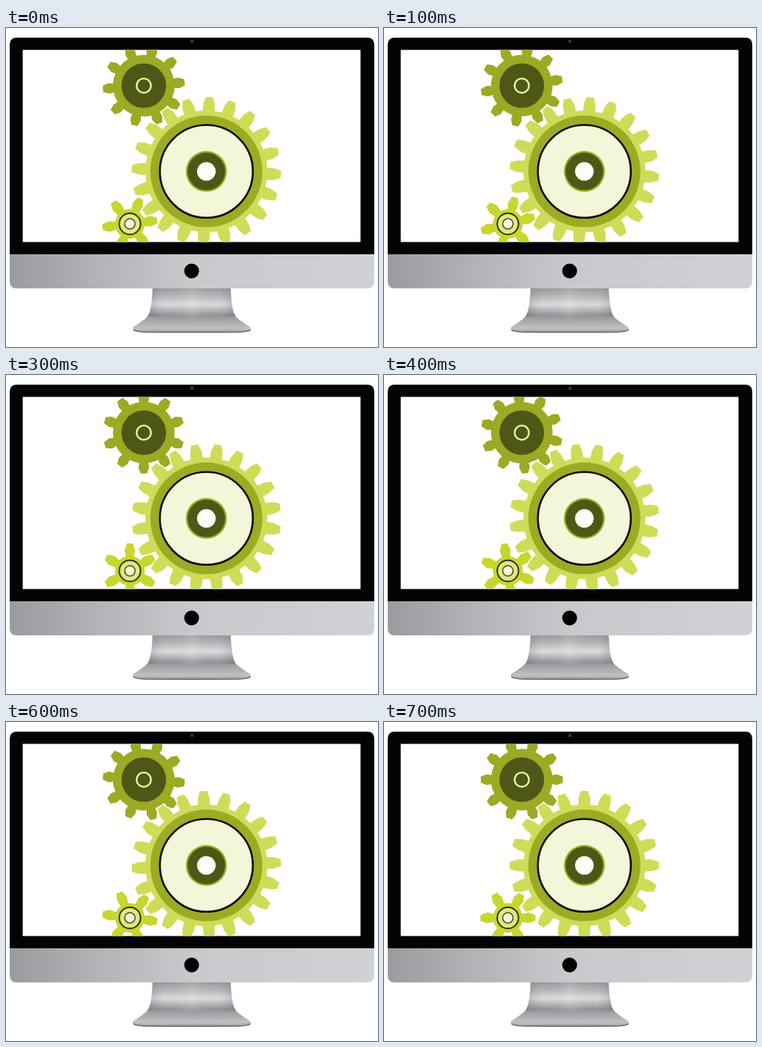
Animation of 500 by 430 pixels, one loop 800 ms. Source, as an HTML page:

```html
<!DOCTYPE html>
<html lang="en">
<head>
<meta charset="utf-8">
<title>Gears on a desktop screen</title>
<style>
  html, body { margin: 0; width: 100%; height: 100%; overflow: hidden; background: #fff; }
  svg { display: block; width: 500px; height: 430px; }
</style>
</head>
<body>
<svg viewBox="0 0 500 430" width="500" height="430">
  <defs>
    <clipPath id="screen"><rect x="22.5" y="29.5" width="454" height="259"/></clipPath>
    <linearGradient id="chin" x1="0" y1="0" x2="1" y2="0">
      <stop offset="0" stop-color="#9b9b9f"/>
      <stop offset=".25" stop-color="#b4b4b8"/>
      <stop offset=".5" stop-color="#c9c9cd"/>
      <stop offset="1" stop-color="#d1d1d5"/>
    </linearGradient>
    <linearGradient id="metal" x1="0" y1="351" x2="0" y2="411" gradientUnits="userSpaceOnUse">
      <stop offset="0" stop-color="#9a9a9f"/>
      <stop offset=".15" stop-color="#b2b2b6"/>
      <stop offset=".36" stop-color="#dcdce0"/>
      <stop offset=".44" stop-color="#c4c4c8"/>
      <stop offset=".6" stop-color="#929297"/>
      <stop offset=".75" stop-color="#a9a9ae"/>
      <stop offset=".9" stop-color="#c2c2c6"/>
      <stop offset="1" stop-color="#949498"/>
    </linearGradient>
    <linearGradient id="sheen" x1="0" y1="0" x2="1" y2="0">
      <stop offset="0" stop-color="#444" stop-opacity=".25"/>
      <stop offset=".2" stop-color="#888" stop-opacity="0"/>
      <stop offset=".5" stop-color="#fff" stop-opacity=".15"/>
      <stop offset=".8" stop-color="#888" stop-opacity="0"/>
      <stop offset="1" stop-color="#444" stop-opacity=".25"/>
    </linearGradient>
  </defs>

  <!-- stand -->
  <path fill="url(#metal)" d="M197 351H302C303 372 305 384 309 389Q312 393 328 403Q331 407 322 409.500Q250 412 178 409.500Q168 407 171 403Q187 393 190 389C194 384 196 372 197 351Z"/>
  <path fill="url(#sheen)" d="M197 351H302C303 372 305 384 309 389H190C194 384 196 372 197 351Z"/>
  <path fill="none" stroke="#68686c" stroke-width="1.500" d="M171 406.500Q174 409.500 188 410H312Q326 409.500 329 406.500"/>

  <!-- case -->
  <path d="M5 305V22.500Q5 13 14.500 13H485.500Q495 13 495 22.500V305Z" fill="#030305"/>
  <path d="M5 305H495V341.500Q495 351 485.500 351H14.500Q5 351 5 341.500Z" fill="url(#chin)"/>
  <circle cx="250" cy="18" r="2.200" fill="#3a3a3e"/>
  <circle cx="249.500" cy="327.500" r="10" fill="#000"/>
  <rect x="22.500" y="29.500" width="454" height="259" fill="#fff"/>
  <g id="gears" clip-path="url(#screen)"></g>
</svg>
<script>
const LOOP = 800, STEP = 100;
const OLIVE = '#9caa24', DARK = '#4f5716', CREAM = '#f3f6d8', INK = '#0c0d04';

// profile: [radius, half width] from tooth root to tip
// turn: +1 clockwise, -1 counter-clockwise; start: angle at time 0
// discs: [radius, fill, stroke, stroke width]
const gears = [
  {
    x: 185.2, y: 77.7, teeth: 10, turn: -1, start: 13.5, body: 41.5, color: OLIVE,
    profile: [[38, 5.5], [47, 7.2], [55, 4.2]],
    discs: [[30, DARK], [9.6, DARK, '#eff3a0', 2.3]]
  },
  {
    x: 166.5, y: 264, teeth: 6, turn: -1, start: 22.5, body: 20, color: '#c8d62e',
    profile: [[16, 4.8], [28, 7.2], [37, 4]],
    discs: [[14.3, '#e0e784', '#30350c', 2], [7, CREAM, '#4a5014', 1.6]]
  },
  {
    x: 269.3, y: 193.3, teeth: 20, turn: 1, start: 2.25, body: 82, color: '#cfdc58',
    profile: [[80, 8.2], [91, 7.8], [100.3, 4.7]],
    discs: [[75.3, OLIVE], [62.5, CREAM, INK, 2.6], [27.5, OLIVE],
            [25.3, DARK], [12.5, '#fdfdf6']]
  }
];

function add(parent, tag, attrs) {
  const el = document.createElementNS('http://www.w3.org/2000/svg', tag);
  for (const key in attrs) el.setAttribute(key, attrs[key]);
  return parent.appendChild(el);
}

function build(gear) {
  const group = add(document.getElementById('gears'), 'g', {
    transform: `translate(${gear.x} ${gear.y})`
  });
  gear.wheel = add(group, 'g', { fill: gear.color });
  const left = gear.profile.map(([r, w]) => [-w, -r]);
  const right = gear.profile.map(([r, w]) => [w, -r]).reverse();
  const points = [...left, ...right].join(' ');
  for (let i = 0; i < gear.teeth; i++) {
    add(gear.wheel, 'polygon', { points, transform: `rotate(${i * 360 / gear.teeth})` });
  }
  add(gear.wheel, 'circle', { r: gear.body });
  for (const [r, fill, stroke = 'none', width = 0] of gear.discs) {
    add(group, 'circle', { r, fill, stroke, 'stroke-width': width });
  }
}

// Each loop advances every gear by one tooth, in hard steps.
function draw(time) {
  const phase = Math.floor(time % LOOP / STEP) * STEP / LOOP;
  for (const gear of gears) {
    const angle = gear.start + gear.turn * phase * 360 / gear.teeth;
    gear.wheel.setAttribute('transform', `rotate(${angle})`);
  }
}

function tick() {
  draw(performance.now());
  requestAnimationFrame(tick);
}

gears.forEach(build);
tick();
</script>
</body>
</html>
```
